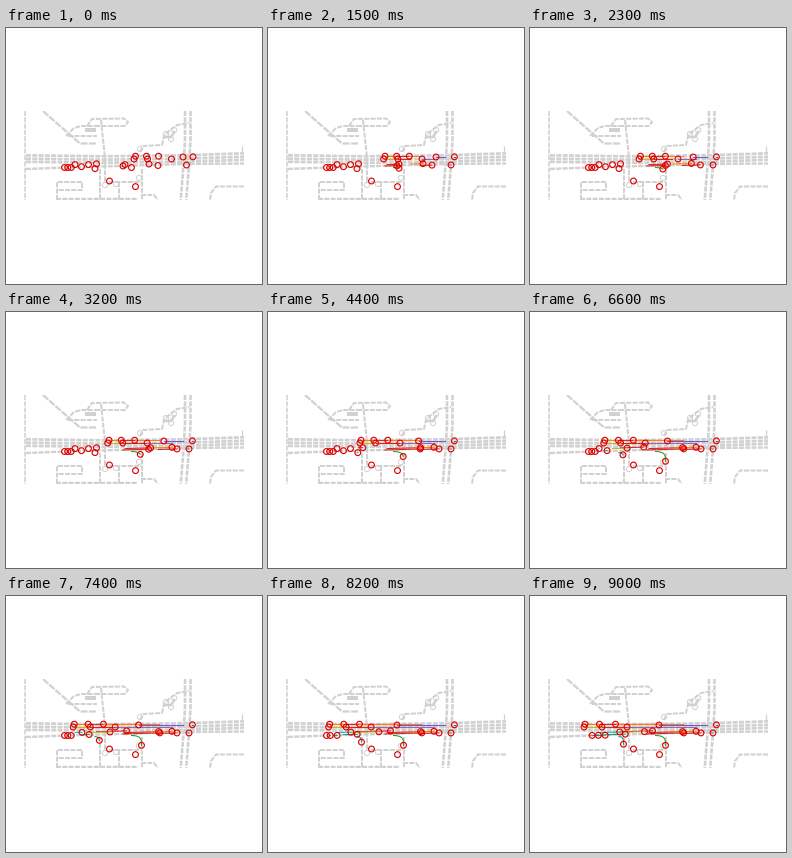
These frames come from a looping animation (256 px wide and 256 px high, 9.1 s). A matplotlib script:

```python
import numpy as np
import matplotlib.pyplot as plt
from matplotlib.animation import FuncAnimation
from matplotlib.patches import Circle, Rectangle

SIZE, DPI = 256, 100
FRAMES, STEP = 91, 100
PT = 72 / DPI  # points per pixel
GREY = "#d1d1d1"

fig = plt.figure(figsize=(SIZE / DPI, SIZE / DPI), dpi=DPI, facecolor="white")
ax = fig.add_axes([0, 0, 1, 1])
ax.set_xlim(0, SIZE)
ax.set_ylim(SIZE, 0)
ax.axis("off")
view = Rectangle((18, 83), 220, 89, transform=ax.transData)
clock = np.arange(FRAMES) * STEP / 1000


def road(*points, width=2.0, dash=5):
    x, y = zip(*points)
    style = (0, (dash / width, 1.3 / width)) if dash else "-"
    line, = ax.plot(x, y, color=GREY, lw=width * PT, ls=style, zorder=1,
                    dash_capstyle="butt", solid_capstyle="butt")
    line.set_clip_path(view)


def ring(x, y, r=2.6):
    ax.add_patch(Circle((x, y), r, fill=False, ec=GREY, lw=PT, zorder=1))


def draw_map():
    # main street: parallel lanes bending slightly at the crossing
    for y in (127.3, 130.7, 133.8):
        road((20, y), (95, y + 1), (178, y), (238, y - 2), width=2.7)
    road((20, 141), (60, 139.5), (178, 136), (238, 135.5), width=2.4)
    road((235.5, 118), (235.5, 125), width=1.3, dash=0)

    # streets from north to south
    road((19, 83), (19, 172), width=1.6)
    road((95, 92), (99, 130), (99, 155))
    for x in (179, 184.5):
        road((x, 83), (x, 112), (x - 1.3, 135), (x - 4.3, 172), width=2.6)

    # north west blocks
    road((37, 83), (54, 98), (74, 115.5), (90, 115.5), width=2.2, dash=7)
    road((60, 108), (68, 100), (75, 98), (91, 98))
    road((62, 108), (91, 108))
    road((79, 102), (90, 102), width=4, dash=0)
    road((81, 98), (86, 91), (118, 90.5), (122, 94), (119, 98), (91, 98))

    # north east lanes and turning loops
    road((134, 124), (137, 118), (156, 117), (158, 108), (163, 103),
         (171, 97), (183, 95))
    road((157, 109), (165, 109), (169, 103), width=2.5, dash=0)
    for x, y in [(160, 106), (165, 111), (168, 102), (134, 121)]:
        ring(x, y)

    # southern blocks
    road((51, 172), (51, 153.5), (76, 153.5), (76, 162), (51, 162))
    road((50, 170.8), (132, 170.8), width=2.4)
    road((135, 167), (148, 167), (152, 172))
    for x, top in [(93.5, 141), (112.5, 154), (135.5, 141)]:
        road((x, top), (x, 172))
    road((103, 154), (135, 154))
    road((238, 158.5), (210, 158.5), (205, 165), (204, 172))
    for x, y in [(99, 157), (110, 156), (133, 150)]:
        ring(x, y)


def drive(x, y, end, start, secs, slope=0.0):
    """Steady run along a lane, standing before and after."""
    u = np.clip((clock - start) / secs, 0, 1)
    dx = (end - x) * u
    return x + dx, y - slope * dx


def turn(x, y, dx, dy, start, secs):
    """Right turn: sideways motion fades while southward motion grows."""
    u = np.clip((clock - start) / secs, 0, 1)
    return x + dx * (1 - (1 - u) ** 3), y + dy * u ** 1.8


def build_tracks():
    cars = []

    # westbound platoons, the last car of the first one halts at a signal
    for y, tints, runs in [
            (128.2, ("C1", "C3", "C1"), [(129.5, 55), (140.5, 69.5), (152.5, 85.5)]),
            (131, ("C8", "C3", "C4"), [(128, 54), (141.5, 72), (165.5, 97)])]:
        for (x, end), tint in zip(runs, tints):
            cars.append((drive(x, y, end, 0, 9), tint))
    cars.append((drive(177, 129, 129, 0, 8), "#6a5acd"))
    cars.append((drive(187, 128.8, 186.4, 0, 0.5), "C0"))

    # eastbound cars closing up to the next signal at a common speed
    for x, y, end, tint in [(117, 138, 153.8, "C3"), (119, 136.6, 152.6, "C3"),
                            (143, 136, 166, "C1"), (152, 137.5, 171, "C3"),
                            (180.5, 137, 183, "C7")]:
        cars.append((drive(x, y, end, 0, (end - x) / 8, 0.03), tint))

    # waiting queue: the start wave travels backwards through each lane
    for y, head, first, speed, xs, tints in [
            (136.6, 90.5, 3.9, 8.6, (90.5, 82.5, 69), ("C3", "C8", "C9")),
            (139.5, 75.5, 6.4, 7.6, (75.5, 65.2, 61.7, 58.5),
             ("#159a8c", "C2", "C0", "C1"))]:
        for x, tint in zip(xs, tints):
            wave = first + 0.125 * (head - x)
            cars.append((drive(x, y - (x == head) * 0.8, x + 32, wave, 32 / speed, 0.03),
                         tint))

    cars.append((turn(125.5, 139.5, 10, 9.8, 0, 6.4), "C2"))
    cars.append((turn(89, 140.6, 4.5, 7.6, 4.1, 4.9), "#159a8c"))
    for x, y in [(103.5, 153), (129.5, 158.6)]:
        cars.append((drive(x, y, x, 0, 1), "C7"))
    return cars


draw_map()
cars = build_tracks()
trails = [ax.plot([], [], color=tint, lw=1.1 * PT, solid_capstyle="projecting",
                  zorder=2)[0] for _, tint in cars]
marks = [ax.add_patch(Circle((0, 0), 2.9, fill=False, ec="#e00000", lw=1.15 * PT,
                             zorder=3)) for _ in cars]


def update(i):
    for ((x, y), _), trail, mark in zip(cars, trails, marks):
        trail.set_data(x[:i + 1], y[:i + 1])
        trail.set_visible(i > 0)
        mark.center = x[i], y[i]
    return trails + marks


anim = FuncAnimation(fig, update, frames=FRAMES, interval=STEP,
                     repeat=True, repeat_delay=0, blit=False)
plt.show()
```
